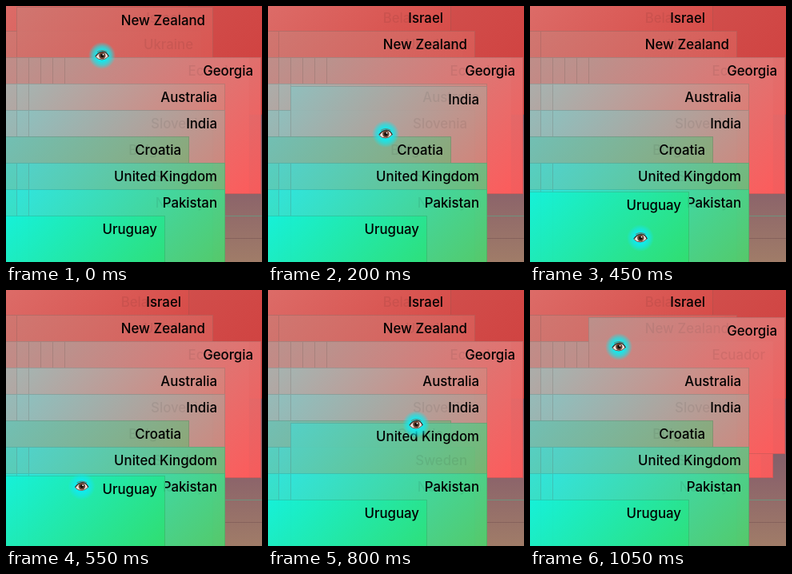
An HTML page that plays this animation: 320 by 320 pixels, repeating every 1100 ms.

```html
<!DOCTYPE html>
<html lang="en">
<head>
<meta charset="utf-8">
<title>Country cards</title>
<style>
  html, body { margin: 0; width: 100%; height: 100%; overflow: hidden; }
  #stage {
    position: relative; width: 320px; height: 320px; overflow: hidden;
    background:
      linear-gradient(rgba(100, 155, 130, .8), rgba(100, 155, 130, .8)) 0 262px / 100% 1px no-repeat,
      linear-gradient(rgba(115, 80, 78, .5), rgba(115, 80, 78, .5)) 0 290px / 100% 1px no-repeat,
      linear-gradient(#6e5468 130px, #8c646a 235px, #a07c68);
  }
  .card {
    position: absolute; box-sizing: border-box; width: 246px; height: 171px;
    border: 1px solid rgba(95, 80, 75, .22);
    background: linear-gradient(135deg, var(--from), var(--to)) border-box;
  }
  .card.up { transform: translateY(-30px); }
  .card span {
    position: absolute; right: 9px; top: 6.4px; white-space: nowrap;
    font: 500 16.8px/20px Inter, "Liberation Sans", sans-serif; color: #000;
  }
  #eye {
    position: absolute; left: -20px; top: -20px; width: 40px; height: 40px;
    background: radial-gradient(circle closest-side, rgba(15, 235, 240, .95) 35%, rgba(20, 230, 235, .65) 58%, rgba(20, 230, 235, 0) 85%);
  }
</style>
</head>
<body>
<div id="stage">
  <svg id="eye" viewBox="-20 -20 40 40">
    <path d="M-8 1.5Q-4-4.5 1-4.5Q6-4 8 1Q4 5 0 5Q-5 5-8 1.5Z" fill="#f1e4df" stroke="#7d5347" stroke-width="1"/>
    <circle cx=".3" cy="0" r="4.2" fill="#6b4332"/>
    <circle cx=".3" cy="0" r="2.2" fill="#140d0c"/>
    <circle cx="1.5" cy="-1.3" r=".9" fill="#fff"/>
    <path d="M-8.2 1Q-4-5 1-5Q6-4.6 8.4 1" fill="none" stroke="#3a2522" stroke-width="1.1"/>
    <path d="M-6-4.5Q0-8.3 6.5-4.6" fill="none" stroke="#8a5a4b" stroke-width=".8"/>
  </svg>
</div>
<script>
const LOOP = 1100, STEP = 50, WIDTH = 246, HEIGHT = 171, LIFT = 30;
const stage = document.getElementById('stage');
const eye = document.getElementById('eye');

// Gradient of each row, top left to bottom right
const backColors = ['#d85a55', '#d83c39'];
const rowColors = [
  ['#dd6e6a', '#d53c38'], ['#cf7771', '#de4c48'], ['#b9938e', '#ff5a5a'],
  ['#a5b4b1', '#f5645a'], ['#8ec0be', '#e1766a'], ['#6fc1b8', '#9b9a58'],
  ['#51d2c9', '#7daf50'], ['#31e4da', '#5bc450'], ['#0ff5eb', '#37d950']
];

// Cards from back to front: [row, left, label]
const cards = [
  [-1, 88, ''],
  [0, -32, 'Belarus'], [0, -17, 'Israel'],
  [1, -17, ''], [1, -2, 'Ukraine'], [1, 13, 'New Zealand'],
  [2, -17, ''], [2, 13, ''], [2, 28, ''], [2, 43, ''], [2, 58, 'Ecuador'], [2, 73, 'Georgia'],
  [3, -17, ''], [3, 13, ''], [3, 28, 'Australia'],
  [4, -17, ''], [4, 13, 'Slovenia'], [4, 28, 'India'],
  [5, -17, 'Bulgaria'], [5, -17, 'Croatia'],
  [6, -17, ''], [6, 13, 'Sweden'], [6, 28, 'United Kingdom'],
  [7, -17, ''], [7, 13, 'Norway'], [7, 28, 'Pakistan'],
  [8, -47, 'Uruguay']
].map(([row, left, label]) => {
  const top = row * 33 - 2;
  return { left, top, el: addCard(left, top, label, rowColors[row] || backColors) };
});

function addCard(left, top, label, [from, to]) {
  const el = document.createElement('div');
  el.className = 'card';
  el.style.left = left + 'px';
  el.style.top = top + 'px';
  el.style.setProperty('--from', from + 'ed');
  el.style.setProperty('--to', to + 'ed');
  const text = document.createElement('span');
  text.textContent = label;
  el.append(text);
  stage.insertBefore(el, eye);
  return el;
}

// Pointer path: [time, x, y]
const path = [
  [0, 120, 62], [200, 147, 160], [300, 195, 227], [450, 138, 290], [650, 75, 189],
  [800, 185, 168], [900, 190, 90], [1000, 145, 26], [1050, 111, 71]
];

function knot(i) {
  const n = path.length, turn = Math.floor(i / n);
  const [t, x, y] = path[i - turn * n];
  return [t + turn * LOOP, x, y];
}

// Closed cubic curve through the path points
function pointAt(t) {
  let i = path.length - 1;
  while (path[i][0] > t) i--;
  const [a, b, c, d] = [-1, 0, 1, 2].map(o => knot(i + o));
  const span = c[0] - b[0], u = (t - b[0]) / span;
  return [1, 2].map(q => {
    const m0 = (c[q] - a[q]) / (c[0] - a[0]) * span;
    const m1 = (d[q] - b[q]) / (d[0] - b[0]) * span;
    return b[q] + u * m0
      + u * u * (3 * (c[q] - b[q]) - 2 * m0 - m1)
      + u * u * u * (2 * (b[q] - c[q]) + m0 + m1);
  });
}

// A lifted card keeps the pointer until it leaves the lifted area
function hit([x, y], lifted) {
  for (let i = cards.length - 1; i >= 0; i--) {
    const { left, top } = cards[i];
    const dy = y - top + (i === lifted ? LIFT : 0);
    if (x >= left && x < left + WIDTH && dy >= 0 && dy < HEIGHT) return i;
  }
  return -1;
}

const poses = [];
let lifted = -1;
for (let t = 0; t < LOOP; t += STEP) {
  const pos = pointAt(t);
  lifted = hit(pos, lifted);
  poses.push({ pos, lifted });
}

let origin = null;
function draw(now) {
  if (origin === null) origin = now;
  const pose = poses[Math.floor((now - origin) % LOOP / STEP)];
  cards.forEach((card, i) => card.el.classList.toggle('up', i === pose.lifted));
  eye.style.transform = `translate(${pose.pos[0]}px, ${pose.pos[1]}px)`;
  requestAnimationFrame(draw);
}
requestAnimationFrame(draw);
</script>
</body>
</html>
```
